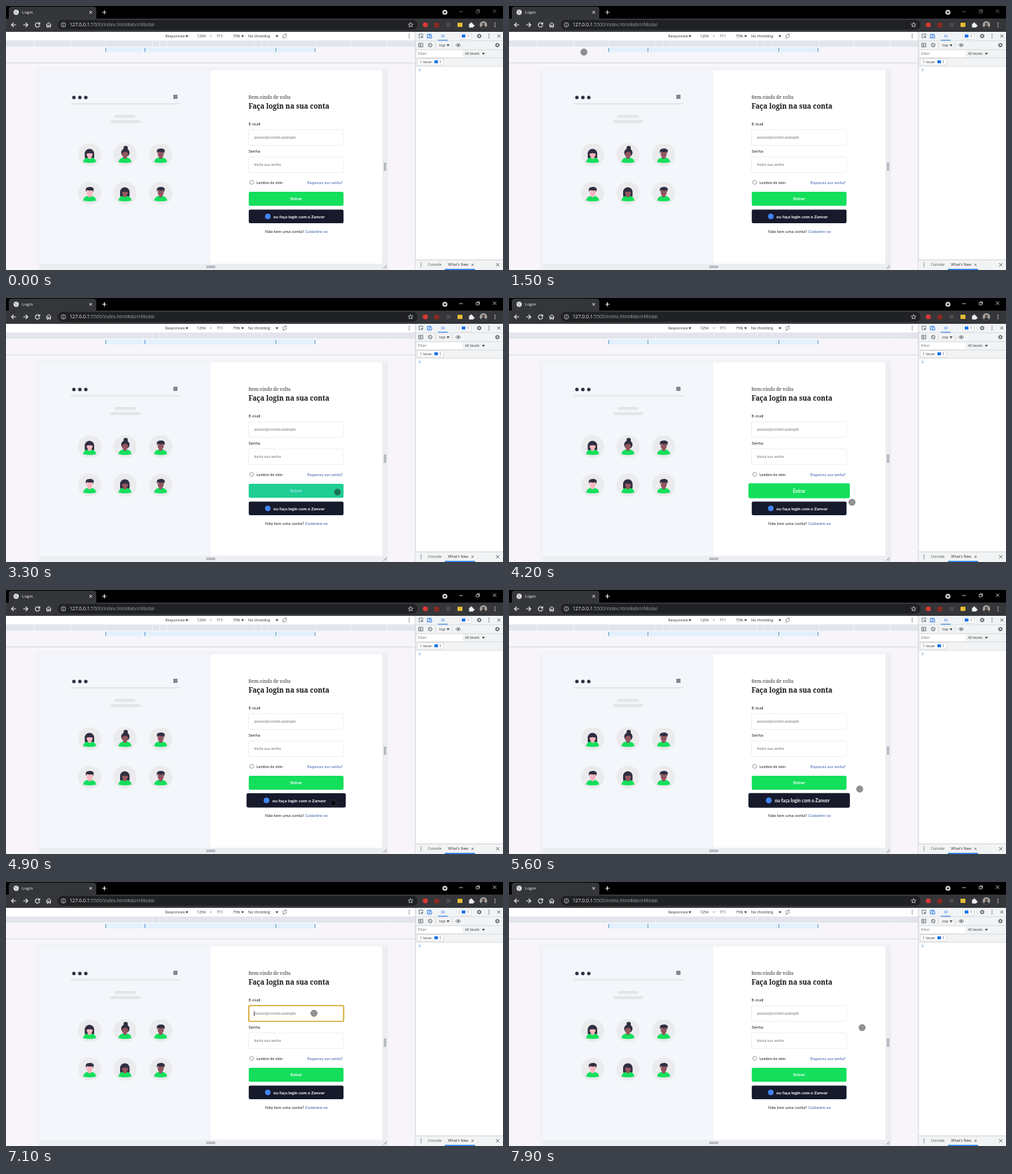
These frames come from a looping animation (710x378 px, 8 s). An HTML page with a canvas:

```html
<!DOCTYPE html>
<html lang="pt-BR">
<head>
<meta charset="utf-8">
<title>Login</title>
<style>
html, body { margin: 0; width: 100%; height: 100%; overflow: hidden; background: #f7f5f9; }
canvas { display: block; width: 710px; height: 378px; }
</style>
</head>
<body>
<canvas id="stage"></canvas>
<script>
const W = 710, H = 378, LOOP = 8000, STEP = 100;
const canvas = document.getElementById('stage');
const ctx = canvas.getContext('2d');
const dpr = window.devicePixelRatio || 1;
canvas.width = W * dpr;
canvas.height = H * dpr;

const LATO = 'Lato, sans-serif', SERIF = '"Noto Serif", serif', UI = '"Open Sans", sans-serif';
const GREEN = '#14df5c', NAVY = '#161a2b', INK = '#2f2e41', BLUE = '#1a73e8', GREY = '#5f6368';

function rect(x, y, w, h, color) {
  ctx.fillStyle = color;
  ctx.fillRect(x, y, w, h);
}

function roundRect(x, y, w, h, r, fill, stroke, width = 1) {
  ctx.beginPath();
  ctx.roundRect(x, y, w, h, r);
  if (fill) { ctx.fillStyle = fill; ctx.fill(); }
  if (stroke) { ctx.strokeStyle = stroke; ctx.lineWidth = width; ctx.stroke(); }
}

function disc(x, y, r, fill, stroke, width = 1) {
  ctx.beginPath();
  ctx.arc(x, y, r, 0, Math.PI * 2);
  if (fill) { ctx.fillStyle = fill; ctx.fill(); }
  if (stroke) { ctx.strokeStyle = stroke; ctx.lineWidth = width; ctx.stroke(); }
}

function path(d, x, y, color, width = 1, fill) {
  ctx.save();
  ctx.translate(x, y);
  const p = new Path2D(d);
  if (fill) { ctx.fillStyle = fill; ctx.fill(p); }
  if (color) { ctx.strokeStyle = color; ctx.lineWidth = width; ctx.stroke(p); }
  ctx.restore();
}

function text(str, x, y, size, color, family = UI, weight = 400, align = 'left') {
  ctx.font = `${weight} ${size}px ${family}`;
  ctx.textAlign = align;
  ctx.textBaseline = 'alphabetic';
  ctx.fillStyle = color;
  ctx.fillText(str, x, y);
}

const cross = (x, y, r, color, width = 0.9) =>
  path(`M${-r} ${-r}L${r} ${r}M${r} ${-r}L${-r} ${r}`, x, y, color, width);
const caretDown = (x, y, color = '#444') => path('M-2 -1.3H2L0 1.8Z', x, y, null, 0, color);
const dots = (x, y, color) => [-2.5, 0, 2.5].forEach(d => disc(x, y + d, 0.75, color));

function gear(x, y) {
  for (let i = 0; i < 8; i++) {
    const a = i * Math.PI / 4;
    disc(x + 2.6 * Math.cos(a), y + 2.6 * Math.sin(a), 0.7, GREY);
  }
  disc(x, y, 1.9, null, GREY, 1.3);
}

function drawBrowser(active) {
  const control = active ? '#e8eaed' : '#77797c';
  rect(0, 0, W, 18, '#000');
  roundRect(4, 1, 125, 20, [4, 4, 0, 0], '#35363a');
  rect(0, 18, W, 19, '#35363a');
  disc(14.5, 9, 3.7, '#f1f3f4');
  path('M-2.6 -1.5Q0 -1 0 .6L2 1.4M-1.8 1.2L-.4 2.6M.6 -2.8L1.6 -1.2', 14.5, 9, '#55575b', 0.9);
  text('Login', 23, 11.2, 6.1, '#f1f3f4');
  cross(121, 9, 1.9, '#e8eaed');
  path('M-3 0H3M0 -3V3', 140.5, 9, active ? '#fff' : '#d5d7da');
  disc(627, 9, 3.6, '#d5d7da');
  caretDown(627, 9.2, '#111');
  path('M-2.6 0H2.6', 650, 8, control, 0.8);
  path('M-2.3 -1H1.3V2.5H-2.3ZM-1 -1V-2.3H2.5V1.2H1.3', 674, 7.5, control, 0.7);
  cross(698, 7.5, 2.3, control, 0.8);

  path('M3.4 0H-3M0 -3.2L-3.2 0L0 3.2', 11, 27, '#f1f3f4', 1.1);
  path('M-3.4 0H3M0 -3.2L3.2 0L0 3.2', 28, 27, '#f1f3f4', 1.1);
  path('M2.6 -1.6A3.1 3.1 0 1 0 3.1 .6M3.1 -3.5V-1H.6', 45, 27, '#f1f3f4', 1.1);
  path('M-3.6 0L0 -3.3L3.6 0M-2.5 -.6V3.2H-.8V.7H.8V3.2H2.5V-.6', 61, 27, '#f1f3f4', 1);
  roundRect(74, 20, 514, 14, 7, '#202124');
  disc(82, 27, 3.2, null, '#d5d7da', 0.8);
  path('M0 -1.8V-1M0 -.3V2', 82, 27, '#d5d7da', 0.9);
  const host = '127.0.0.1';
  text(host, 91, 29.4, 6.75, '#f1f3f4');
  const hostWidth = ctx.measureText(host).width;
  text(':5500/index.html#abrirModal', 91 + hostWidth, 29.4, 6.75, '#9aa0a6');
  path('M0 -3.4L1 -1.1L3.4 -1L1.5 .6L2.2 3L0 1.6L-2.2 3L-1.5 .6L-3.4 -1L-1 -1.1Z', 578, 27, '#d5d7da', 0.8);
  disc(599, 27, 3.6, '#d63a34');
  rect(612, 24, 6.5, 6.5, '#8d2923');
  rect(629, 24, 6, 6, '#4b4a46');
  rect(645, 24, 7, 6, '#e3bd32');
  path('M-3 -1.8H-1A1.3 1.3 0 1 1 1.4 -1.8H3V.1A1.3 1.3 0 1 1 3 2.4V3.8H-3Z', 664.5, 27, null, 0, '#f1f3f4');
  ctx.save();
  disc(682, 27, 5.3, '#a5a5a1');
  ctx.clip();
  disc(682, 26, 2.2, '#65534c');
  disc(682, 32.5, 4.4, '#343238');
  ctx.restore();
  dots(698.5, 27, '#e8eaed');
}

function drawDeviceBar() {
  rect(0, 37, 585, 12.5, '#fff');
  const ink = '#303236';
  text('Responsive', 227.5, 45.2, 5.3, ink);
  caretDown(258.5, 43.2);
  text('1254', 273, 45.2, 5.3, ink);
  text('×', 292.5, 45.2, 5.3, GREY, UI, 400, 'center');
  text('711', 301, 45.2, 5.3, ink);
  text('75%', 324, 45.2, 5.3, ink);
  caretDown(338, 43.2);
  text('No throttling', 346, 45.2, 5.3, ink);
  caretDown(387, 43.2);
  path('M-2.8 0L0 -2.8L2.8 0L0 2.8ZM1 -3.2L3 -2.5M-1 3.2L-3 2.5', 398, 43, GREY, 0.8);
  dots(576, 43, GREY);

  rect(0, 49.5, 585, 8.5, '#e2e5eb');
  [62, 73, 83, 150, 200, 252].forEach(d => {
    rect(292 - d, 50, 0.7, 8, '#f5f6f9');
    rect(292 + d, 50, 0.7, 8, '#f5f6f9');
  });
  rect(142, 59.5, 300, 7, '#e2f1fd');
  [142, 198, 385, 441].forEach(x => rect(x, 60, 1, 6, '#619bc7'));
  rect(0, 81, 585, 0.8, '#cfcfd4');
}

// Small bust: hair is 'bob', 'bun' or 'short'.
function bust(x, y, hair, skin) {
  disc(x, y, 16.5, '#ebebed');
  ctx.save();
  ctx.translate(x, y);
  if (hair === 'bob') roundRect(-7, -8.5, 13.5, 14, [7, 7, 2, 2], INK);
  path('M-9.5 10.5Q-8.5 5 -3 4H3Q8.5 5 9.3 10.5Q0 13 -9.5 10.5Z', 0, 0, null, 0, GREEN);
  path('M-2.4 1H2.4V4.5Q0 7.5 -2.4 4.5Z', 0, 0, null, 0, skin);
  if (hair === 'bun') {
    disc(1, -9.6, 3.1, INK);
    disc(0.5, -3, 6, INK);
  }
  ctx.beginPath();
  ctx.ellipse(0, -1, 4.3, 5.2, 0, 0, Math.PI * 2);
  ctx.fillStyle = skin;
  ctx.fill();
  if (hair === 'bob') path('M-5.5 -1.3Q-5 -7.5 0 -7.5Q5 -7 5.2 -1.3Q0 -3 -5.5 -1.3Z', 0, 0, null, 0, INK);
  if (hair === 'bun') path('M-5 -1Q-5 -7 0 -7.5Q5 -7 5.5 -1Q3 -4.5 0 -4.5Q-3 -4 -5 -1Z', 0, 0, null, 0, INK);
  if (hair === 'short') path('M-5 -2Q-7 -7 -3 -8.5Q4 -10.5 6 -6L4.8 -1.5L3.8 -4.2Q-1 -3 -4 -4.5Z', 0, 0, null, 0, INK);
  ctx.restore();
}

function drawIllustration() {
  [97, 105.5, 114].forEach(x => disc(x, 131, 2.5, INK));
  [128, 130, 132].forEach(y => rect(239, y - 0.5, 6, 1.1, INK));
  rect(92, 139.5, 156.5, 1, '#d6d8dc');
  roundRect(155, 156, 30, 4, 2, '#e3e4e7');
  roundRect(149, 163.5, 43, 4, 2, '#e3e4e7');
  const pale = '#fcb6c0', dark = '#94565f';
  bust(119.5, 213, 'bob', pale);
  bust(170, 213, 'bun', dark);
  bust(221, 213, 'short', dark);
  bust(119.5, 268, 'short', pale);
  bust(170, 268, 'bob', dark);
  bust(221, 268, 'short', dark);
}

function field(y, hint, focused, caret) {
  roundRect(346.5, y, 135.5, 22.5, 1.5, '#fff', '#ebebee', 0.8);
  if (focused) roundRect(346.8, y, 135.6, 22.5, 1.5, null, '#d3a62d', 1.7);
  text(hint, 354.5, y + 13.2, 5.5, '#757575', LATO);
  if (caret) rect(354, y + 7.5, 0.7, 7.5, '#222');
}

function button(y, h, color, scale, drawLabel, glow) {
  ctx.save();
  ctx.translate(414.5, y + h / 2);
  ctx.scale(scale, scale);
  roundRect(-67.7, -h / 2, 135.4, h, 2, color);
  drawLabel();
  if (glow) roundRect(-67.7, -h / 2, 135.4, h, 2, 'rgba(51,181,229,0.4)');
  ctx.restore();
}

const ease = p => 1 - Math.pow(1 - Math.min(1, Math.max(0, p)), 2.2);
const hoverScale = (t, start, end) => t < start || t >= end ? 1 : 1 + 0.07 * ease((t - start) / 500);
const within = (t, from, to) => t >= from && t < to;

function drawPage(t) {
  rect(0, 82, 585, 296, '#f7f5f9');
  rect(44, 89, 502, 289, '#f2f2f6');
  rect(537, 92, 9, 286, '#eceef2');
  rect(48, 369, 498, 9, '#eceef2');
  rect(48, 92, 244, 277, '#f3f6fa');
  rect(292, 92, 245.5, 277, '#fff');
  rect(540, 224, 1, 12, '#8d9095');
  rect(542, 224, 1, 12, '#8d9095');
  rect(286, 372, 13, 1, '#8d9095');
  rect(286, 374, 13, 1, '#8d9095');
  path('M-2.5 2.5L2.5 -2.5M.3 2.5L2.5 .3', 541.5, 373.5, '#777', 0.8);
  drawIllustration();

  text('Bem-vindo de volta', 346.5, 133, 6.5, '#333', SERIF);
  text('Faça login na sua conta', 346.5, 147, 9.85, '#111', SERIF, 700);
  text('E-mail', 346.5, 171.3, 6.2, '#222', LATO);
  text('Senha', 346.5, 210.3, 6.2, '#222', LATO);
  const blink = t % 1000 < 500;
  const onEmail = within(t, 7100, 7700), onPassword = within(t, 6200, 7100);
  field(177, 'pessoa@correio.example', onEmail, onEmail && blink);
  field(216, 'Insira sua senha', onPassword, onPassword && blink);
  disc(351, 252.5, 2.8, '#fff', '#777', 0.7);
  text('Lembre de mim', 358, 254.7, 5.5, '#222', LATO);
  text('Esqueceu sua senha?', 481, 254.7, 5.5, '#3d5fb0', LATO, 400, 'right');

  button(266, 20, GREEN, hoverScale(t, 3300, 4700),
    () => text('Entrar', 0, 2.4, 6.1, '#fff', LATO, 700, 'center'), within(t, 3300, 3500));
  button(291.5, 19.5, NAVY, hoverScale(t, 4700, 6200), () => {
    disc(-40.5, 0, 3.9, '#4285f4');
    text('ou faça login com o Zanvor', -32.5, 2.3, 6.13, '#fff', LATO, 700);
  }, within(t, 4700, 4800));

  const question = 'Não tem uma conta? ';
  text(question, 370, 325, 6.2, '#222', LATO);
  text('Cadastre-se', 370 + ctx.measureText(question).width, 325, 6.2, '#3d5fb0', LATO);
}

function drawDevtools() {
  rect(585, 37, 125, 341, '#fff');
  rect(585, 37, 125, 49, '#f1f3f4');
  rect(584.5, 37, 0.8, 341, '#c4c6c9');
  [49.5, 62, 74, 86].forEach(y => rect(585, y, 125, 0.7, '#d0d3d7'));

  path('M2.5 -1V-2.8H-2.8V2.5H-1M0 0L3 1L1.6 1.6L1 3Z', 593, 43, GREY, 0.8);
  path('M-3 2.5V-2.5H2.5M-.2 -1H3V3H-.2ZM-3.5 2.7H-1', 605, 43, BLUE, 0.9);
  path('M-2.2 -2L-.2 0L-2.2 2M.5 -2L2.5 0L.5 2', 624, 43, BLUE, 0.8);
  rect(617, 48.5, 14, 1, BLUE);
  roundRect(648.5, 38.8, 16, 8.8, 1.2, '#fff', '#ccd0d4', 0.7);
  rect(651, 40.7, 5.3, 4.5, BLUE);
  text('1', 658.5, 45, 5.3, '#333');
  gear(676, 43);
  dots(690, 43, GREY);
  cross(704, 43, 2.1, GREY);

  path('M-3 -2.7H3V2.7H-3ZM-1 -1.5L1.3 0L-1 1.5Z', 592.5, 56, GREY, 0.8);
  disc(606, 56, 2.6, null, GREY, 0.9);
  path('M-1.8 -1.8L1.8 1.8', 606, 56, GREY, 0.9);
  rect(613, 52, 0.7, 8, '#ccd0d4');
  text('top', 619, 57.9, 5.4, '#333');
  caretDown(631.5, 56.2);
  rect(637, 52, 0.7, 8, '#ccd0d4');
  path('M-3.6 0Q0 -4.2 3.6 0Q0 4.2 -3.6 0Z', 646, 56, GREY, 0.8);
  disc(646, 56, 1.2, GREY);
  gear(702, 56);

  rect(587, 63.5, 65, 9.5, '#fff');
  text('Filter', 588.5, 70, 5.3, '#757575');
  text('All levels', 655.5, 70, 5.3, '#444');
  caretDown(682, 68.2);
  roundRect(587.5, 75.5, 37.5, 9, 1, '#fff', '#ccd0d4', 0.7);
  text('1 Issue:', 591, 81.8, 5.1, '#333');
  rect(612, 77.7, 5.2, 4.3, BLUE);
  text('1', 619, 81.8, 5.1, '#333');
  path('M-1 -1.8L1 0L-1 1.8', 591, 91.5, '#4285d8', 0.9);

  rect(585, 363, 125, 15, '#f1f3f4');
  rect(585, 363, 125, 0.7, '#c4c6c9');
  dots(593, 370.5, GREY);
  text('Console', 602.5, 372.4, 5.3, '#555');
  text("What's New", 631.5, 372.4, 5.3, '#333');
  cross(666.5, 370.5, 1.4, '#444', 0.8);
  rect(627, 376.5, 43, 1.5, BLUE);
  cross(702.5, 370.5, 2.1, '#444');
}

// Pointer strokes as [time, x, y]; the pointer is off the page between them.
const STROKES = [
  [[1500, 107, 66], [1600, 160, 175], [1700, 264, 372], [1799, 264, 372]],
  [[2100, 270, 372], [2200, 296, 336], [2300, 325.5, 306], [2400, 372, 290], [2500, 420, 281],
   [2600, 458, 278], [2700, 473.5, 278], [4100, 473.5, 278], [4200, 490, 292.5], [4300, 486, 302],
   [4400, 474, 305], [4500, 467.5, 305], [5200, 467.5, 305], [5500, 495, 301], [5600, 501, 285],
   [5700, 494, 258], [5800, 468, 236], [5900, 445, 227], [6000, 438, 225.5], [6600, 438, 225.5],
   [6800, 440, 202], [7000, 440, 188], [7300, 440, 188], [7500, 470, 191], [7700, 504.5, 208.5],
   [8000, 504.5, 208.5]]
];

function pointerAt(t) {
  const keys = STROKES.find(k => within(t, k[0][0], k[k.length - 1][0]));
  if (!keys) return null;
  const i = keys.findIndex(k => k[0] > t);
  const [t0, x0, y0] = keys[i - 1], [t1, x1, y1] = keys[i];
  const p = (t - t0) / (t1 - t0);
  return [x0 + (x1 - x0) * p, y0 + (y1 - y0) * p];
}

function drawPointer(t) {
  const at = pointerAt(t);
  if (!at) return;
  disc(...at, 4.5, 'rgba(0,0,0,0.42)', 'rgba(90,90,90,0.65)', 0.9);
}

function render(now) {
  const t = Math.floor(now % LOOP / STEP) * STEP;
  ctx.setTransform(dpr, 0, 0, dpr, 0, 0);
  rect(0, 0, W, H, '#f7f5f9');
  drawBrowser(t >= 3300);
  drawDeviceBar();
  drawPage(t);
  drawDevtools();
  drawPointer(t);
}

const start = performance.now();
function tick() {
  render(performance.now() - start);
  requestAnimationFrame(tick);
}
tick();
</script>
</body>
</html>
```
